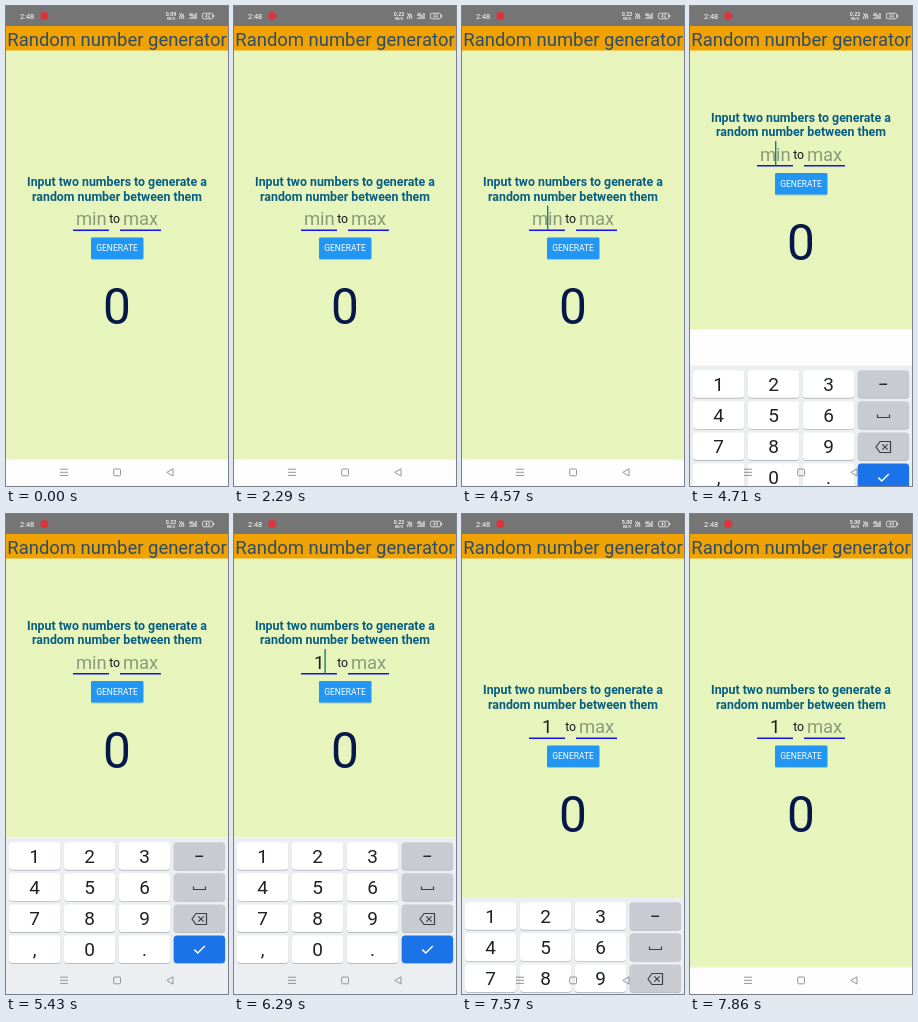
Animation of 222 by 480 pixels, one loop 8000 ms. Source, as an HTML page:

```html
<!DOCTYPE html>
<html lang="en">
<head>
<meta charset="utf-8">
<title>Random number generator</title>
<style>
  html, body { margin: 0; width: 100%; height: 100%; overflow: hidden; background: #fdfdfd; }
  svg { display: block; width: 100%; height: 100%; }
  text { font-family: Roboto, "Open Sans", sans-serif; }
  .mid { text-anchor: middle; }
  .status { fill: #fff; }
  .caption { font-size: 12.35px; font-weight: 700; fill: #075d82; }
  .field { font-size: 18.46px; fill: #1b1d18; }
  .hint { fill: #8d997a; }
  .line { stroke: #1612ee; stroke-width: 1.4; }
  .key { fill: #fff; }
  .side { fill: #c8cbd2; }
  .enter { fill: #1a73e8; }
  .key.down { fill: #d3d6da; }
  .enter.down { fill: #1755b5; }
  .digit { font-size: 19px; fill: #1f2124; }
  .icon { fill: none; stroke: #3c4043; stroke-width: 1.2; }
  .nav { fill: none; stroke: #8b8b8b; stroke-width: 0.9; }
</style>
</head>
<body>
<svg viewBox="0 0 222 480" preserveAspectRatio="none">
  <rect width="222" height="480" fill="#fdfdfd"/>
  <rect id="page" y="44" width="222" height="409.5" fill="#e7f5bc"/>

  <g id="content">
    <text class="caption mid" x="111" y="180.3">Input two numbers to generate a</text>
    <text class="caption mid" x="111" y="194.6">random number between them</text>
    <text id="min" class="field mid" x="85.3" y="219.3">min</text>
    <text class="mid" x="108.6" y="217" font-size="12.3" fill="#111">to</text>
    <text class="field hint mid" x="134.6" y="219.3">max</text>
    <path class="line" d="M67 224.3H103M114 224.3H155"/>
    <rect id="caret" y="199.5" width="1.4" height="24.5" fill="#16807c"/>
    <rect x="85" y="232.6" width="52.4" height="21.3" rx="1.5" fill="#8fae9c" opacity=".6"/>
    <rect x="85" y="231.6" width="52.4" height="21.4" rx="1.2" fill="#2196f3"/>
    <text class="mid" x="111.1" y="245.4" font-size="8.5" fill="#fff">GENERATE</text>
    <text class="mid" x="111" y="318" font-size="49.5" fill="#06184a">0</text>
  </g>

  <g id="keyboard">
    <rect y="323.5" width="222" height="158" fill="#eceff2"/>
  </g>

  <g class="nav">
    <path d="M54 463.2H62M54 466.3H62M54 469.4H62"/>
    <rect x="107.7" y="463" width="6.8" height="6.8" rx="1"/>
    <path d="M167 462.8V470L160.8 466.4Z"/>
  </g>

  <rect width="222" height="20" fill="#757575"/>
  <g class="status">
    <text x="14" y="12.6" font-size="7.4">2:48</text>
    <circle cx="38.3" cy="10" r="4" fill="#e0343c"/>
    <text id="speed" class="mid" x="165" y="9.8" font-size="5.4" font-weight="500"></text>
    <text class="mid" x="165" y="13.8" font-size="3.6" font-weight="500">KB/S</text>
    <text class="mid" x="175.6" y="9.6" font-size="4" font-weight="700">Vo</text>
    <text class="mid" x="175.6" y="13.2" font-size="3.6" font-weight="700">LTE</text>
    <text x="183" y="9.6" font-size="3.6" font-weight="700">4G</text>
    <path d="M184 13V11.5M186 13V10.3M188 13V8.8M190 13V7" stroke="#fff" stroke-width="1"/>
    <rect x="196.4" y="7.2" width="10.4" height="5.6" rx="1.6" fill="none" stroke="#fff" stroke-width=".7"/>
    <rect x="207.3" y="8.9" width=".9" height="2.2"/>
    <text class="mid" x="201.6" y="11.7" font-size="4.6">49</text>
  </g>

  <rect y="20" width="222" height="24.5" fill="#f0a202"/>
  <text class="mid" x="111" y="39.8" font-size="18.46" fill="#2c4d69">Random number generator</text>
</svg>

<script>
const LOOP = 8000;
const LIFT = 64.5;

// Each table holds [start ms, value]; a value stays until the next start.
const steps = {
  speed: [[0, "0.09"], [1710, "0.22"], [7000, "5.00"]],
  open: [[0, false], [4710, true], [7570, false]],
  slide: [[0, 160], [4710, 36], [4850, 3], [5000, 0], [7570, 60], [7710, 160]],
  typed: [[0, false], [6000, true]],
  caret: [[0, false], [4430, true], [5000, false], [5570, true], [6570, false],
          [7000, true], [7570, false]],
  one: [[0, false], [5860, true], [6140, false]],
  enter: [[0, false], [7430, true], [7710, false]]
};

const $ = id => document.getElementById(id);
const at = (table, t) => table.reduce((v, [start, next]) => t >= start ? next : v, table[0][1]);

function add(tag, attrs, text = "") {
  const el = document.createElementNS("http://www.w3.org/2000/svg", tag);
  for (const name in attrs) el.setAttribute(name, attrs[name]);
  el.textContent = text;
  return $("keyboard").appendChild(el);
}

function addKey(label, col, row) {
  const x = 3 + col * 54.9, y = 328.2 + row * 31.1;
  const kind = col < 3 ? "" : row < 3 ? " side" : " enter";
  const box = { x, width: 51.4, height: 27.6, rx: 3.5 };
  add("rect", { ...box, y: y + 0.9, fill: "#b9bdc2" });
  const key = add("rect", { ...box, y, class: "key" + kind });
  if (label) add("text", { x: x + 25.7, y: y + 20.7, class: "digit mid" }, label);
  return key;
}

const keys = ["123−", "456 ", "789 ", ",0. "].map((line, row) =>
  [...line].map((c, col) => addKey(c.trim(), col, row)));

add("path", { class: "icon", d: "M187.5 372.5V375.5H199.5V372.5" });
add("path", { class: "icon", d: "M186 405L190 399.5H200.5V410.5H190ZM192.3 402.3L197.7 407.7M197.7 402.3L192.3 407.7" });
add("path", { class: "icon", style: "stroke:#fff;stroke-width:1.5", d: "M188.3 435.6L191.8 439L198.8 432" });

function draw(t) {
  const now = {};
  for (const name in steps) now[name] = at(steps[name], t);
  $("speed").textContent = now.speed;
  $("page").setAttribute("height", now.open ? 279.5 : 409.5);
  $("content").setAttribute("transform", `translate(0 ${now.open ? -LIFT : 0})`);
  $("keyboard").setAttribute("transform", `translate(0 ${now.slide})`);
  $("min").textContent = now.typed ? "1" : "min";
  $("min").classList.toggle("hint", !now.typed);
  $("caret").setAttribute("x", now.typed ? 90.4 : 85);
  $("caret").setAttribute("visibility", now.caret ? "visible" : "hidden");
  keys[0][0].classList.toggle("down", now.one);
  keys[3][3].classList.toggle("down", now.enter);
}

const start = performance.now();
function tick() {
  draw((performance.now() - start) % LOOP);
  requestAnimationFrame(tick);
}
tick();
</script>
</body>
</html>
```
